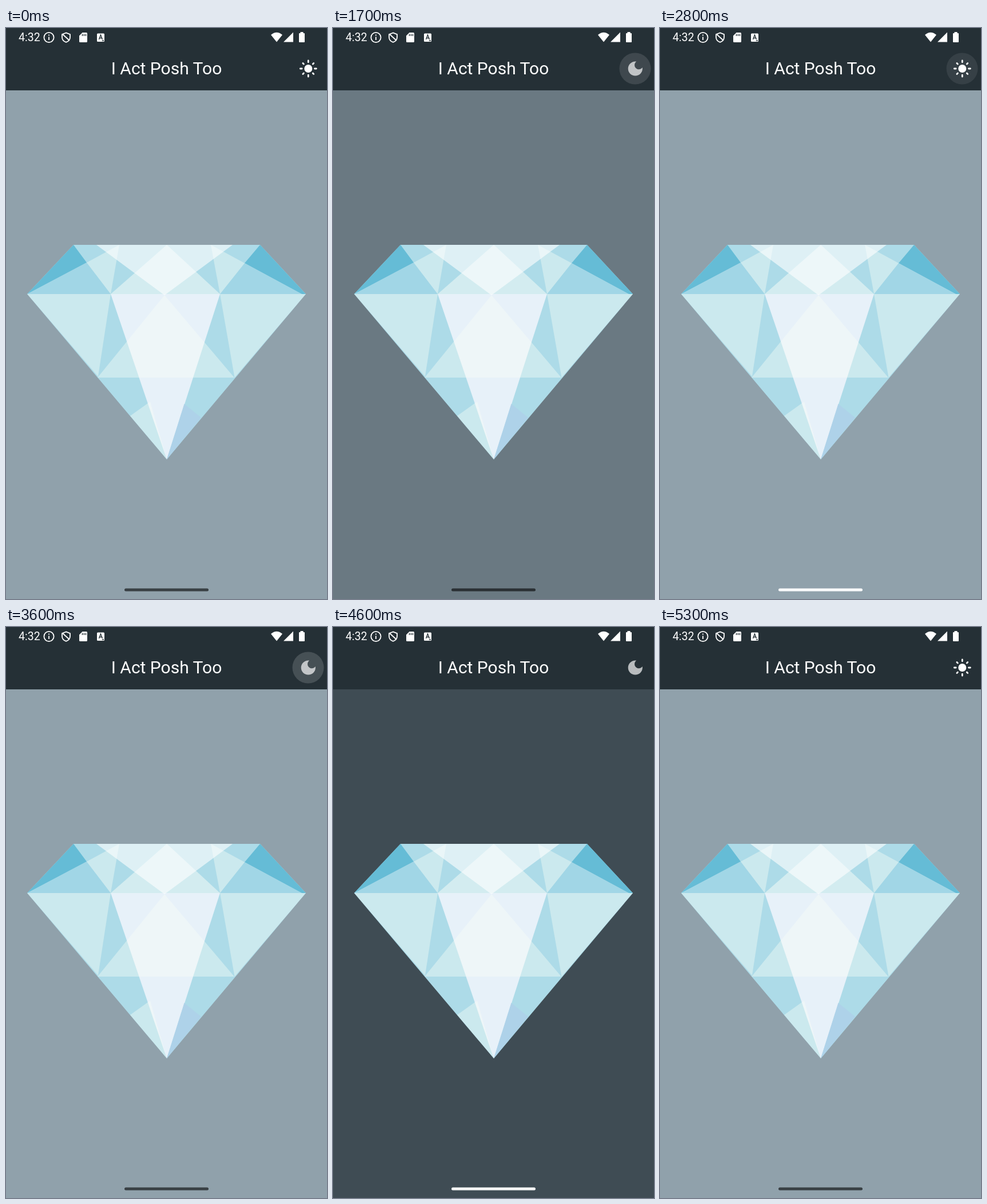
An HTML page that plays this animation: 561x998 px, repeating every 5500 ms.

```html
<!DOCTYPE html>
<html lang="en">
<head>
<meta charset="utf-8">
<style>
  html, body { margin: 0; width: 100%; height: 100%; overflow: hidden; }
  svg { display: block; width: 100%; height: 100%; }
  text { font-family: Roboto, sans-serif; fill: #fff; }
</style>
</head>
<body>
<svg viewBox="0 0 561 998">
  <rect id="page" y="100" width="561" height="898"/>
  <rect width="561" height="109" fill="#253036"/>

  <!-- status bar -->
  <text x="22" y="23" font-size="19.5">4:32</text>
  <g fill="none" stroke="#fff" stroke-width="1.8">
    <circle cx="75" cy="16.5" r="8.6"/>
    <path d="M75 15.5v5.5M75 11.6v2"/>
    <path d="M105 8.4l7 2.7v5c0 4.2-2.8 7.4-7 8.8-4.200-1.400-7-4.600-7-8.800v-5zM99 11l12 11"/>
  </g>
  <g fill="#fff">
    <path d="M133.500 8h7a1.500 1.500 0 0 1 1.500 1.500v14a1.500 1.500 0 0 1-1.500 1.500h-11a1.500 1.500 0 0 1-1.500-1.500v-10z"/>
    <rect x="159" y="9.500" width="13" height="14.500" rx="1.500"/>
    <path d="M463 12q10-8.500 20 0l-10 12.500z"/>
    <path d="M485 24.500h17v-17z"/>
    <path d="M514.500 7h5v2h1.500a1 1 0 0 1 1 1v14a1 1 0 0 1-1 1h-8a1 1 0 0 1-1-1v-14a1 1 0 0 1 1-1h1.500z"/>
  </g>
  <path d="M133.500 10.500v3.500M136.500 10.500v3.500M139.500 10.500v3.500M162.500 20l3-8 3 8M163.500 17.500h4M168 22h3" fill="none" stroke="#253036" stroke-width="1.400"/>

  <text x="280.500" y="81" font-size="30" text-anchor="middle">I Act Posh Too</text>

  <!-- theme button -->
  <circle id="ripple" cx="528" cy="71" fill="#fff"/>
  <g id="sun" transform="translate(528.3 71)" fill="#fff" stroke="#fff" stroke-width="2.800" stroke-linecap="round">
    <circle r="7" stroke="none"/>
    <path d="M0-11.200V-14M0 11.200V14M-11.200 0H-14M11.200 0H14M8 8l1.400 1.400M-8 8l-1.400 1.400M8-8l1.400-1.400M-8-8l-1.400-1.400"/>
  </g>
  <path id="moon" transform="translate(511.500 54.200) scale(1.400)" fill="#fff" fill-opacity=".68" d="M12 3c-4.970 0-9 4.030-9 9s4.030 9 9 9 9-4.030 9-9c0-.46-.04-.92-.1-1.360-.98 1.370-2.580 2.260-4.400 2.260-2.980 0-5.400-2.420-5.400-5.400 0-1.810.89-3.420 2.260-4.400-.44-.06-.9-.1-1.360-.1z"/>

  <!-- diamond -->
  <path fill="#addbe8" d="M118 379H444L524 465L281 754L37 465z"/>
  <path fill="#65bcd6" d="M118 379L37 465L141 410zM444 379L524 465H517L417 411z"/>
  <path fill="#a1d6e6" d="M37 465L141 410L183 465zM517 465L417 411L374 465z"/>
  <path fill="#e7f1f9" d="M183 465H374L281 754z"/>
  <path fill="#aed2e9" d="M311.500 657L341 681L281 754z"/>
  <g fill="#f7fdf6" fill-opacity=".4">
    <path d="M198 379L141 410L183 465zM358 379L417 411L374 465z"/>
    <path d="M37 465H183L161 609zM374 465H524L399.500 611z"/>
    <path d="M277 467L160 611H399z"/>
    <path d="M217 678L252 653L281 754z"/>
  </g>
  <path fill="#f7fdf8" fill-opacity=".52" d="M183 465L281 379L374 465z"/>
  <path fill="#fff" fill-opacity=".6" d="M158 379H396L277 467z"/>

  <rect id="pill" x="207" y="979.500" width="147" height="5" rx="2.500"/>
</svg>
<script>
const LOOP = 5500, PRESS = 130;
const LIGHT = [144, 161, 171], DARK = [63, 76, 84];

// each tap: release time, home bar recolouring time, ripple strength, ripple fade
const taps = [
  [1606, 2000, .155, 400],
  [2600, 2860, .155, 400],
  [3600, 4050, .155, 400],
  [4726, 5100, .11, 270]
];

const el = id => document.getElementById(id);
const [page, ripple, sun, moon, pill] = ['page', 'ripple', 'sun', 'moon', 'pill'].map(el);
const ramp = (t, start, length) => Math.min(1, Math.max(0, (t - start) / length));
const mix = (a, b, p) => a + (b - a) * p;

function draw(t) {
  let dark = 0, white = 0, night = false, glow = 0, radius = 0;
  taps.forEach(([release, recolour, strength, fade], i) => {
    const goal = i % 2 ? 0 : 1;
    dark = mix(dark, goal, ramp(t, release, 200));
    white = mix(white, goal, ramp(t, recolour, 140));
    if (t >= release) night = goal === 1;

    const press = release - PRESS;
    if (t >= press && t < release + fade) {
      glow = strength * ramp(t, press, 75) * (1 - ramp(t, release, fade));
      radius = mix(9, 27.5, ramp(t, press, PRESS));
    }
  });

  page.setAttribute('fill', `rgb(${LIGHT.map((c, i) => mix(c, DARK[i], dark))})`);
  const shade = 255 * white;
  pill.setAttribute('fill', `rgba(${shade},${shade},${shade},${mix(.6, .95, white)})`);
  ripple.setAttribute('r', radius);
  ripple.setAttribute('opacity', glow);
  sun.style.display = night ? 'none' : '';
  moon.style.display = night ? '' : 'none';
}

const start = performance.now();
function tick() {
  draw((performance.now() - start) % LOOP);
  requestAnimationFrame(tick);
}
tick();
</script>
</body>
</html>
```
